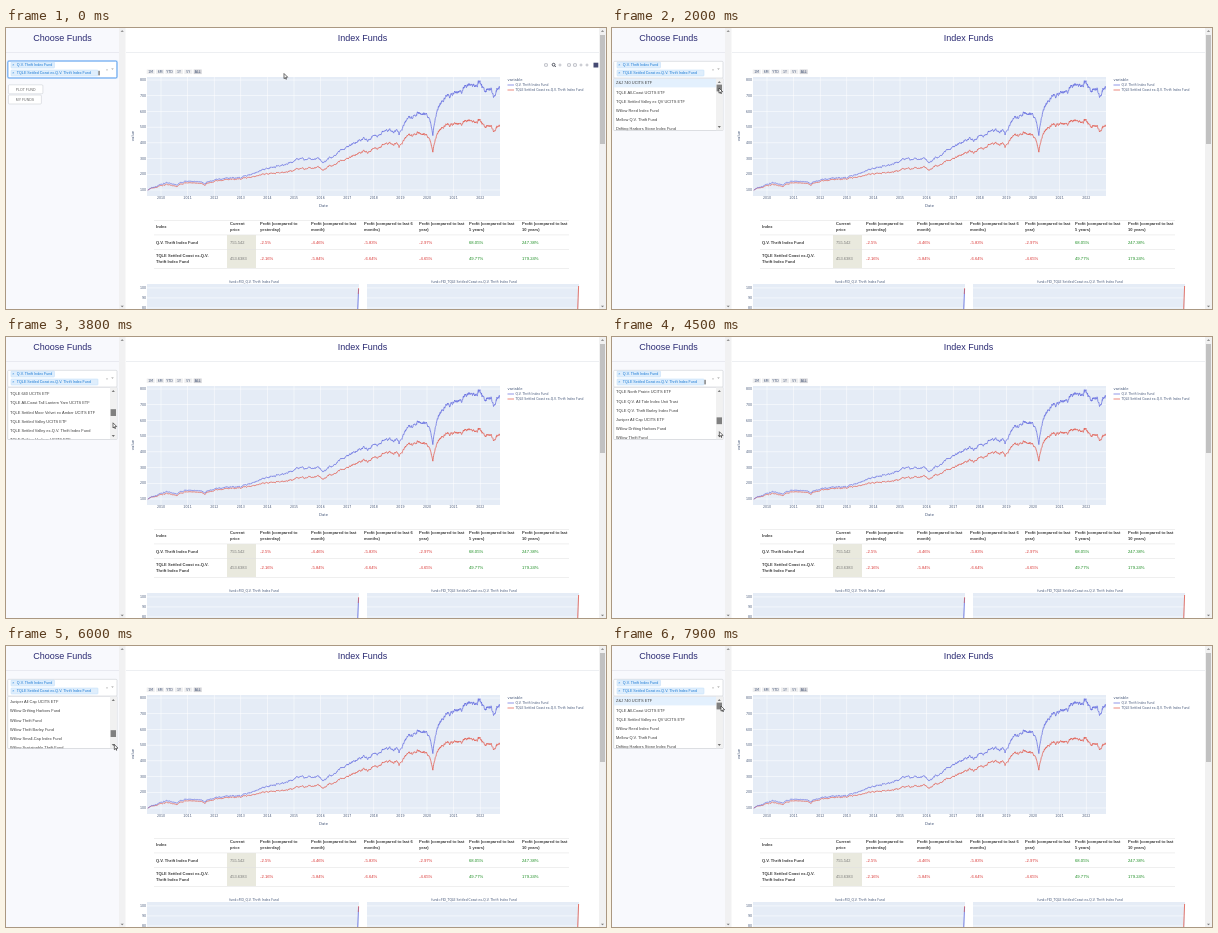
An HTML page with a canvas that plays this animation: 600 px wide and 281 px high, repeating every 8000 ms.

```html
<!DOCTYPE html>
<html lang="en">
<head>
<meta charset="utf-8">
<title>Index Funds</title>
<style>
html, body { margin: 0; width: 100%; height: 100%; overflow: hidden; background: #fff; }
canvas { display: block; width: 600px; height: 281px; }
</style>
</head>
<body>
<canvas id="stage"></canvas>
<script>
const W = 600, H = 281, LOOP = 8000;
const SANS = '"Liberation Sans", Arial, sans-serif';
const WIDE = '"DejaVu Sans", Verdana, sans-serif';
const BLUE = '#636bdf', RED = '#e2574a', NAVY = '#2a2a72', SLATE = '#46587a';
const FUND_A = 'Q.V. Thrift Index Fund';
const FUND_B = 'TQLE Settled Coast ex-Q.V. Thrift Index Fund';
const OPTIONS = [
  'Z&J 740 UCITS ETF',
  'TQLE All-Coast UCITS ETF',
  'TQLE Settled Valley ex QV UCITS ETF',
  'Willow Reed Index Fund',
  'Mellow Q.V. Thrift Fund',
  'Drifting Harbors Stone Index Fund',
  'OLW Settled Coast All Cap Thrift Index Fund',
  'OLW Settled Coast All Cap Thrift Index Fund (QV)',
  'OLW Drifting Harbors All Cap Thrift Index Fund',
  'OLW Willow All Cap UCITS ETF',
  'TQLE Settled Coast UCITS ETF',
  'TQLE 300 Index Unit Trust',
  'TQLE 640 UCITS ETF',
  'TQLE All-Coast Tall Lantern Yarn UCITS ETF',
  'TQLE Settled Moor Velvet ex Amber UCITS ETF',
  'TQLE Settled Valley UCITS ETF',
  'TQLE Settled Valley ex-Q.V. Thrift Index Fund',
  'TQLE Drifting Harbors UCITS ETF',
  'TQLE North Prairie UCITS ETF',
  'TQLE Q.V. All Tide Index Unit Trust',
  'TQLE Q.V. Thrift Barley Index Fund',
  'Juniper All Cap UCITS ETF',
  'Willow Drifting Harbors Fund',
  'Willow Thrift Fund',
  'Willow Thrift Barley Fund',
  'Willow Small-Cap Index Fund',
  'Willow Sustainable Thrift Fund'
];

const dpr = window.devicePixelRatio || 1;
const stage = document.getElementById('stage');
const page = document.createElement('canvas');
for (const c of [stage, page]) {
  c.width = Math.round(W * dpr);
  c.height = Math.round(H * dpr);
  c.getContext('2d').scale(dpr, dpr);
}
let g = page.getContext('2d');

function rect(x, y, w, h, color) {
  g.fillStyle = color;
  g.fillRect(x, y, w, h);
}
function frame(x, y, w, h, r, fill, stroke, width = 0.6) {
  g.beginPath();
  g.roundRect(x, y, w, h, r);
  g.fillStyle = fill;
  g.fill();
  g.strokeStyle = stroke;
  g.lineWidth = width;
  g.stroke();
}
function line(points, color, width) {
  g.beginPath();
  points.forEach(([x, y]) => g.lineTo(x, y));
  g.strokeStyle = color;
  g.lineWidth = width;
  g.lineJoin = 'round';
  g.stroke();
}
// Drawn at 20px and scaled evenly so that tiny type keeps its true spacing.
function text(s, x, y, size, color, { align = 'left', font = SANS, bold = false, turn = 0 } = {}) {
  g.save();
  g.translate(x, y);
  g.rotate(turn);
  g.scale(size / 20, size / 20);
  g.font = (bold ? 'bold ' : '') + '20px ' + font;
  g.textAlign = align;
  g.textBaseline = 'alphabetic';
  g.fillStyle = color;
  g.fillText(s, 0, 7);
  g.restore();
}
const label = (s, x, y, align = 'center', size = 3.2) => text(s, x, y, size, SLATE, { align, font: WIDE });

function triangle(x, y, r, dir, color) {
  g.beginPath();
  g.moveTo(x - r, y + dir * r / 2);
  g.lineTo(x + r, y + dir * r / 2);
  g.lineTo(x, y - dir * r / 2);
  g.fillStyle = color;
  g.fill();
}
function random(seed) {
  return () => (seed = (seed * 16807) % 2147483647) / 2147483647;
}
const clamp = v => Math.min(1, Math.max(0, v));
const ease = v => v * v * (3 - 2 * v);
function mix(keys, t) {
  const i = keys.findIndex(k => k[0] > t);
  if (i < 0) return keys[keys.length - 1][1];
  if (i === 0) return keys[0][1];
  const [t0, a] = keys[i - 1], [t1, b] = keys[i];
  return a + (b - a) * (t - t0) / (t1 - t0);
}

// Prices: a trend through a few points, market falls shared by both funds, and a random walk.
const yearX = year => 155 + (year - 2010) * 26.6;
const priceY = price => 177.7 - price * 0.1571;
const FALLS = [[2010.6, 0.12], [2011.65, 0.16], [2016.1, 0.1], [2018.95, 0.12], [2020.22, 0.3], [2022.2, 0.08], [2022.5, 0.12]];

function series(trend, color) {
  const rnd = random(4242), pts = [];
  let walk = 0;
  for (let year = 2009.5; year < 2022.75; year += 0.01) {
    walk = walk * 0.9 + (rnd() - 0.5) * 0.028;
    let price = mix(trend, year) * (1 + walk);
    for (const [at, depth] of FALLS) price *= 1 - depth * Math.exp(-Math.abs(year - at) / 0.13);
    pts.push([yearX(year), priceY(price)]);
  }
  line(pts, color, 0.75);
}

function drawChart() {
  rect(141, 49, 353, 119, '#e5ecf6');
  for (let year = 2010; year <= 2022; year++) {
    rect(yearX(year) - 0.25, 49, 0.5, 119, '#fff');
    label(year, yearX(year), 170.3);
  }
  for (let price = 100; price <= 800; price += 100) {
    rect(141, priceY(price) - 0.25, 353, 0.5, '#fff');
    label(price, 140, priceY(price), 'right');
  }
  label('Date', 317.5, 177.5, 'center', 3.8);
  text('value', 127, 108, 3.8, SLATE, { align: 'center', font: WIDE, turn: -Math.PI / 2 });

  g.save();
  g.beginPath();
  g.rect(141, 49, 353, 119);
  g.clip();
  series([[2009.5, 100], [2010.2, 134], [2013, 172], [2015.2, 232], [2016.3, 250],
    [2017, 300], [2018.8, 415], [2020.1, 485], [2021.9, 555], [2022.7, 525]], RED);
  series([[2009.5, 100], [2010.2, 145], [2013, 180], [2015.2, 295], [2016.3, 300],
    [2017, 375], [2018.8, 500], [2020.1, 630], [2021.9, 800], [2022.7, 775]], BLUE);
  g.restore();

  ['1M', '6M', 'YTD', '1Y', '5Y', 'ALL'].forEach((s, i) => {
    const x = 144.7 + i * 9.4;
    rect(x - 4, 41.5, 8, 4.6, i === 5 ? '#d2d2d6' : '#eeeeef');
    label(s, x, 43.8);
  });
  label('variable', 501.5, 52, 'left', 3.7);
  [[FUND_A, BLUE, 57], [FUND_B, RED, 62]].forEach(([name, color, y]) => {
    line([[501.5, y], [508, y]], color, 0.7);
    label(name, 509.5, y, 'left', 3.05);
  });
}

function drawTable() {
  const cols = [150, 224, 254, 305, 358, 413, 463, 516];
  const heads = ['|yesterday)', ' last|month)', ' last 6|months)', ' last|year)', ' last|5 years)', ' last|10 years)'];
  const rows = [
    [[FUND_A], 214.7, '755.542', '-2.5%', '-4.46%', '-5.83%', '-2.97%', '68.05%', '247.38%'],
    [['TQLE Settled Coast ex-Q.V.', 'Thrift Index Fund'], 230.5, '453.6383', '-2.16%', '-5.84%', '-6.64%', '-4.65%', '49.77%', '179.24%']
  ];
  const head = (s, x, y) => text(s, x, y, 4.05, '#3c3c3c', { bold: true });
  rect(221, 207, 29, 33, '#e9e9de');
  for (const y of [192, 206.7, 221, 240]) rect(148, y, 415, 0.5, '#dedede');
  head('Index', 150, 198.7);
  ['Current|price', ...heads.map(h => 'Profit (compared to' + h)].forEach((h, i) =>
    h.split('|').forEach((s, j) => head(s, cols[i + 1], 195.3 + j * 6.6)));
  for (const [name, y, price, ...gains] of rows) {
    name.forEach((s, i) => head(s, 150, y + (i - (name.length - 1) / 2) * 6.6));
    text(price, 224, y, 4, '#777');
    gains.forEach((s, i) => text(s, cols[i + 2], y, 4.2, s[0] === '-' ? '#d8302f' : '#158a1c'));
  }
}

function drawSmallCharts() {
  [[141, FUND_A, BLUE, 261], [361, FUND_B, RED, 258]].forEach(([x, name, color, top]) => {
    rect(x, 256, 212, 25, '#e5ecf6');
    for (let i = 0; i < 3; i++) rect(x, 259.7 + i * 10, 212, 0.5, '#fff');
    label('fund=FID_' + name, x + 107, 253.5, 'center', 3.1);
    line([[x + 210.7, H], [x + 211.6, top]], color, 0.8);
  });
  line([[352.3, 266], [352.6, 260]], RED, 0.6);
  for (let i = 0; i < 3; i++) label(100 - i * 10, 140, 260 + i * 10, 'right');
}

function drawPage() {
  rect(0, 0, W, H, '#fff');
  rect(0, 0, 113, H, '#f8f9fd');
  rect(113, 0, 6.5, H, '#f1f1f2');
  rect(593, 0, 7, H, '#f1f1f1');
  rect(594, 7, 5, 109, '#c1c1c1');
  for (const x of [116.2, 596.5]) {
    triangle(x, 3, 1.6, 1, '#777');
    triangle(x, 278.5, 1.6, -1, '#777');
  }
  rect(0, 24, 113, 0.6, '#dfe2ea');
  rect(120, 24, 473, 0.6, '#e2e4ea');
  text('Choose Funds', 56.6, 10, 9, NAVY, { align: 'center' });
  text('Index Funds', 356.5, 10, 9, NAVY, { align: 'center' });
  drawChart();
  drawTable();
  drawSmallCharts();
}

function drawModebar() {
  const grey = '#b0b3bb', dark = '#50545f';
  for (const x of [540, 563, 569]) frame(x - 1.4, 35.7, 2.8, 2.6, 0.3, '#fff', grey, 0.8);
  for (const x of [554, 575, 581]) {
    line([[x - 1.5, 37], [x + 1.5, 37]], grey, 0.8);
    line([[x, 35.5], [x, 38.5]], grey, 0.8);
  }
  frame(546.2, 35.3, 2.8, 2.8, 1.4, '#fff', dark, 1);
  line([[548.6, 37.7], [549.8, 39]], dark, 1);
  rect(587.5, 34.7, 4.8, 4.8, '#454a72');
}

function drawSelect(open, caret) {
  if (open) frame(1.7, 33.3, 109.3, 16.9, 1, '#fff', '#cccfd4');
  else {
    frame(1.6, 32.8, 109.6, 17.4, 1.2, '#fff', '#cfe3fb', 1.8);
    frame(1.9, 33.1, 109, 16.8, 1, '#fff', '#3d8fea', 0.8);
  }
  [[FUND_A, 37, 43.5], [FUND_B, 45, 87]].forEach(([name, y, w]) => {
    frame(5, y - 3, w, 6, 0.8, '#dfeefc', '#bfddf8', 0.5);
    text('×', 6.2, y, 3.7, '#2583dc');
    text(name, 10.8, y, 3.65, '#1778d4');
  });
  if (caret) rect(92.6, 42.8, 0.9, 4.6, '#333');
  text('×', 101, 41.2, 4.2, '#999', { align: 'center' });
  triangle(106.5, 41.2, 1.3, -1, '#999');
}

function drawButtons() {
  [['PLOT FUND', 56.8, 34.5], ['MY FUNDS', 67, 33]].forEach(([s, y, w]) => {
    frame(2.4, y, w, 9, 1, '#fff', '#cdd0d6');
    text(s, 2.4 + w / 2, y + 4.6, 3.5, '#666', { align: 'center' });
  });
}

function drawMenu(scroll) {
  const row = 9.15;
  frame(1.7, 50.3, 109.3, 52.2, 0.5, '#fff', '#c8cbd0');
  g.save();
  g.beginPath();
  g.rect(2, 50.6, 102, 51.6);
  g.clip();
  rect(2, 50.6 - scroll * row, 102, 8.8, '#e3f0fd');
  OPTIONS.forEach((s, i) => text(s, 4, 55 + (i - scroll) * row, 3.95, '#3c3c3c'));
  g.restore();
  rect(104, 50.6, 6.7, 51.6, '#f1f1f1');
  triangle(107.3, 54, 1.6, 1, '#555');
  triangle(107.3, 99, 1.6, -1, '#444');
  rect(104.6, 56.6 + scroll * 1.32, 5.4, 6.8, '#808080');
}

function drawCursor([x, y]) {
  g.save();
  g.translate(x, y);
  g.beginPath();
  g.moveTo(0, 0);
  g.lineTo(0, 5.2);
  g.lineTo(1.3, 4);
  g.lineTo(2.2, 5.9);
  g.lineTo(2.1, 3.8);
  g.lineTo(3.7, 3.7);
  g.closePath();
  g.fillStyle = '#fff';
  g.fill();
  g.strokeStyle = '#333';
  g.lineWidth = 0.7;
  g.stroke();
  g.restore();
}

const OPEN = 1300;
const SCROLL = [[2200, 0], [3800, 11.8], [4500, 18], [5300, 20.9], [6000, 20.9], [6900, 6.45], [7500, 0]];

function cursorAt(t, scroll) {
  if (t < OPEN) {
    const p = ease(clamp(t / 900));
    return [278 - 199 * p, 45.5 - 2.5 * p];
  }
  const p = ease(clamp((t - OPEN) / 700));
  return [79 + 28 * p + 2 * clamp((t - 4000) / 3000), 43 + 17 * p + 38.5 * (scroll / 20.9) ** 0.7];
}

// The caret blinks, is hidden while the menu opens, and stays lit while scrolling by click.
function caretOn(t) {
  if (t >= OPEN && t < 2600) return false;
  if (t >= 4200 && t < 4740) return true;
  return Math.floor((t + 50) / 530) % 2 === 0;
}

drawPage();
g = stage.getContext('2d');

function draw(t) {
  const open = t >= OPEN;
  const scroll = mix(SCROLL, t);
  const cursor = cursorAt(t, scroll);
  g.drawImage(page, 0, 0, W, H);
  if (cursor[0] > 120) drawModebar();
  drawSelect(open, caretOn(t));
  if (open) drawMenu(scroll);
  else drawButtons();
  drawCursor(cursor);
}

const start = performance.now();
function tick(now) {
  const t = Math.max(0, now - start) % LOOP;
  draw(Math.floor(t / 100) * 100);
  requestAnimationFrame(tick);
}
draw(0);
requestAnimationFrame(tick);
</script>
</body>
</html>
```
